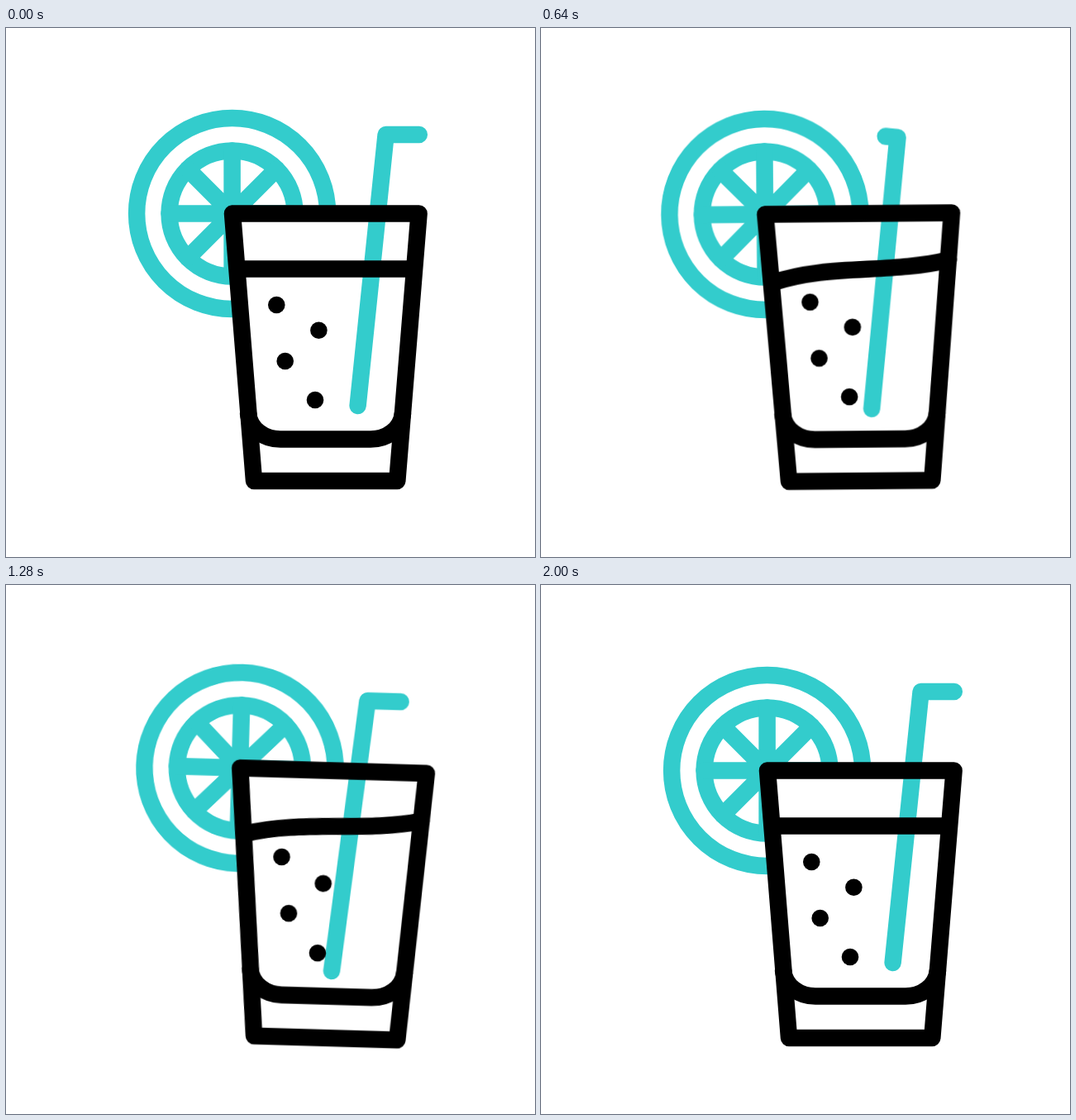
Animation of 640 by 640 pixels, one loop 2.22 s. Source, as an HTML page without scripts:

```html
<!DOCTYPE html>
<html lang="en">
<head>
<meta charset="utf-8">
<title>Swaying drink</title>
<style>
html, body { margin: 0; width: 100%; height: 100%; overflow: hidden; background: #fff; }
svg { display: block; width: 100vw; height: 100vh; }
.line { fill: none; stroke: #000; stroke-width: 20.5; stroke-linecap: round; stroke-linejoin: round; }
.teal { stroke: #33cccc; }

/* 2 s of motion and a 220 ms rest */
.sway, .dip, .straw, .surface, .bubbles {
  animation: 2220ms cubic-bezier(.333, 0, .667, 1) infinite;
}
.sway { transform-origin: 386.6px 548px; animation-name: sway; }
.dip { animation-name: dip; }
.straw { animation-name: turn; }
.surface { animation-name: slosh; }
.bubbles { animation-name: rise; }

@keyframes sway {
  0%, 90.09%, 100% { transform: rotate(0deg); }
  19.82% { transform: rotate(-5deg); }
  37.84% { transform: rotate(4deg); }
  48.65% { transform: rotate(-3deg); }
  59.46% { transform: rotate(2deg); }
  72.07% { transform: rotate(-1deg); }
}
@keyframes dip {
  0%, 72.07%, 100% { transform: translate(0px, 0px); }
  18.02% { transform: translate(0px, 11px); }
  36.04% { transform: translate(-38px, 0px); }
  54.05% { transform: translate(-38px, 11px); }
}
@keyframes turn {
  0%, 54.05%, 100% { d: path("M499.8 129L459.6 129L425.6 457"); }
  18.02% { d: path("M429.6 127L459.6 129L425.6 457"); }
}
@keyframes slosh {
  0%, 90.09%, 100% { d: path("M281 291.5C350 291.5 424 291.5 493 291.5"); }
  22.52% { d: path("M282 312.5C350 278.5 424 304.5 496 276"); }
  45.05% { d: path("M281 286C350 311.5 424 270.5 492 304"); }
  67.57% { d: path("M284 316C345 267.5 429 316.5 497 267.5"); }
}
@keyframes rise {
  0%, 90.09%, 100% { transform: translateY(0px); }
  45.05% { transform: translateY(-5.5px); }
}
</style>
</head>
<body>
<svg viewBox="0 0 640 640">
  <defs>
    <path id="glass" d="M274 224.5H499.6L473.3 548H300Z"/>
  </defs>
  <g class="sway">
    <g class="line teal" transform="translate(273.6 224.5)">
      <circle r="115.5"/>
      <circle r="76"/>
      <path d="M0 -76V76M-76 0H76M-53.7 -53.7L53.7 53.7M-53.7 53.7L53.7 -53.7"/>
    </g>
    <use href="#glass" fill="#fff"/>
    <g class="dip">
      <path class="line teal straw" d="M499.8 129L459.6 129L425.6 457"/>
    </g>
    <path class="line surface" d="M281 291.5C350 291.5 424 291.5 493 291.5"/>
    <path class="line" d="M293 466C295 485 312 497.5 332 497.5H441C461 497.5 478 485 480 466"/>
    <use href="#glass" class="line"/>
    <g class="bubbles">
      <circle cx="327.3" cy="335" r="10.3"/>
      <circle cx="378.4" cy="365.8" r="10.3"/>
      <circle cx="337.7" cy="403" r="10.3"/>
      <circle cx="374" cy="450" r="10.3"/>
    </g>
  </g>
</svg>
</body>
</html>
```
